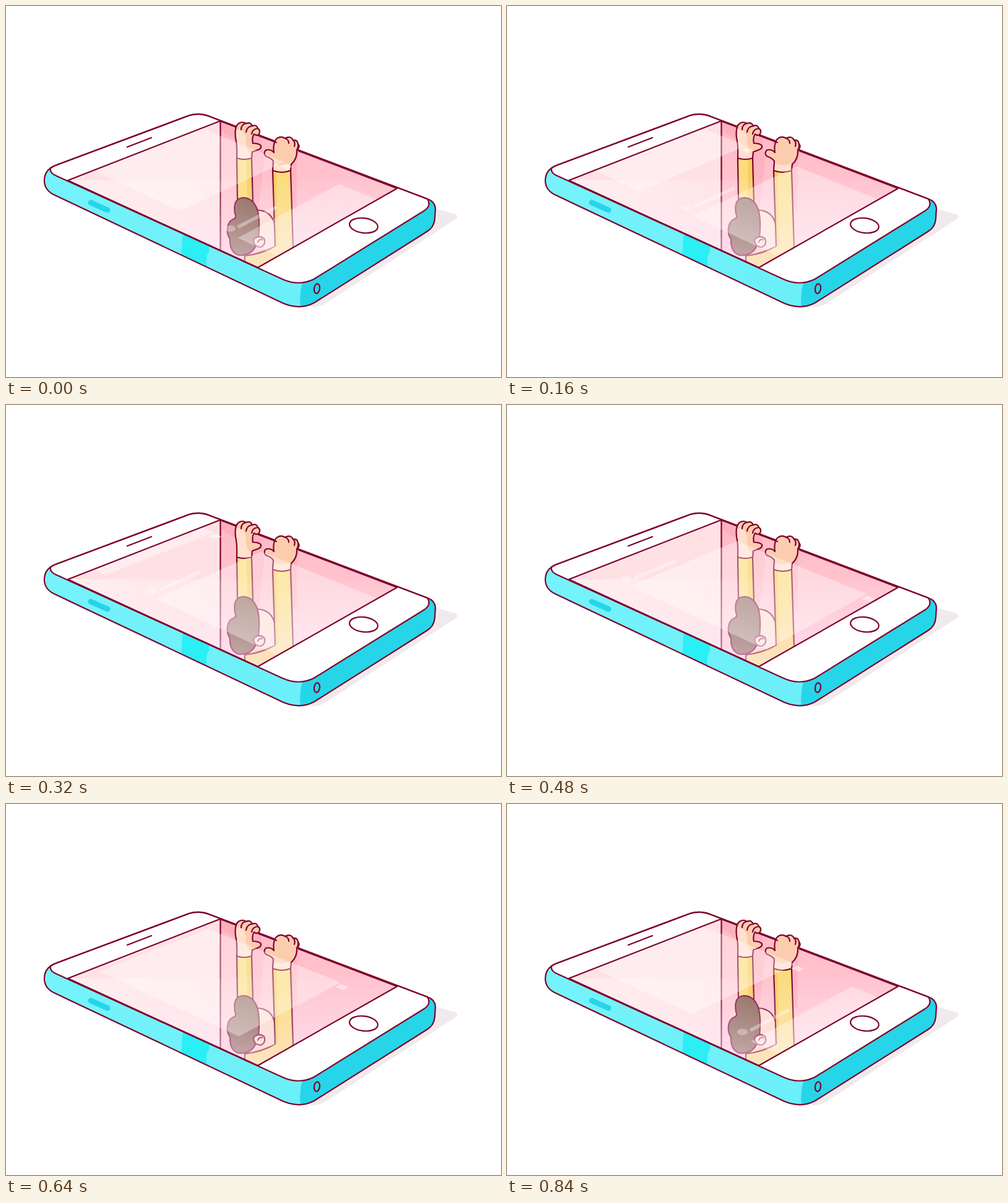
These frames come from a looping animation (800 px wide and 600 px high, 0.88 s). An HTML page:

```html
<!DOCTYPE html>
<html lang="en">
<head>
<meta charset="utf-8">
<title>Endless feed</title>
<style>
html, body { margin: 0; width: 100%; height: 100%; overflow: hidden; background: #fff; }
svg { display: block; width: 800px; height: 600px; }
.line { fill: none; stroke: #7d002d; stroke-width: 2.2; stroke-linecap: round; stroke-linejoin: round; }
</style>
</head>
<body>
<svg viewBox="0 0 800 600">
  <defs>
    <clipPath id="screen"><path d="M100 282L346 186L632 295L407 423Z"/></clipPath>
    <clipPath id="body"><path id="bodyShape" d="M72 262Q61 270 62 284Q63 298 77 305L440 477Q472 494 498 480L680 365Q692 358 693 344L694 327Q693 316 681 312L330 179Q313 172 296 177L82 257Q76 259 72 262Z"/></clipPath>
    <linearGradient id="side"><stop stop-color="#76f3fa"/><stop offset="1" stop-color="#66edf8"/></linearGradient>
    <linearGradient id="rightWall" x2="0" y2="1"><stop stop-color="#ffb9c3"/><stop offset="1" stop-color="#ffd0dc"/></linearGradient>
    <linearGradient id="haze"><stop stop-color="#fff" stop-opacity=".45"/><stop offset="1" stop-color="#fff" stop-opacity="0"/></linearGradient>
    <linearGradient id="glow" gradientUnits="userSpaceOnUse" x1="0" y1="275" x2="0" y2="425">
      <stop stop-color="#fff0fb" stop-opacity="0"/><stop offset=".55" stop-color="#ffebfc" stop-opacity=".28"/><stop offset="1" stop-color="#ffe9ff" stop-opacity=".55"/>
    </linearGradient>
  </defs>

  <path fill="#f0eaee" d="M685 325L727 337Q732 340 728 344L515 482Q506 488 490 487Z"/>
  <g clip-path="url(#body)">
    <path fill="url(#side)" d="M50 170H710V500H50Z"/>
    <path fill="#2aeff4" d="M286 366L328 386V398Q323 402 324 421L283 402Z"/>
    <path fill="#27d5e8" d="M483 440L710 300V500H481Q473 486 476 465Q476 452 483 440Z"/>
  </g>
  <path d="M137 318L164 330" stroke="#25d5ea" stroke-width="9" stroke-linecap="round"/>
  <path class="line" style="fill:#fff" d="M72 262Q70 270 82 275L445 441Q472 454 497 442L676 331Q688 323 681 312L330 179Q313 172 296 177L82 257Q76 259 72 262Z"/>
  <use href="#bodyShape" class="line"/>
  <ellipse class="line" cx="502.5" cy="457" rx="4.5" ry="7.8" transform="rotate(8 502 457)"/>
  <ellipse class="line" style="fill:#fff" cx="578" cy="355" rx="23" ry="12" transform="rotate(7 578 355)"/>
  <path class="line" d="M196 228L235 213"/>

  <g clip-path="url(#screen)">
    <path fill="#ffe1e4" d="M90 180H346V430H90Z"/>
    <path fill="url(#rightWall)" d="M346 180H640V430H346Z"/>
    <path fill="#f99fae" opacity=".4" d="M346 186L372 196V218L346 200ZM398 206L412 211L417 250L408 330H398ZM462 230L474 236L470 252V330H462Z"/>
    <path class="line" d="M346.5 186V396"/>

    <path fill="#fbdc7b" d="M386 403L436 388L466 380V425H386Z"/>
    <path class="line" d="M386 403V416M386 404Q414 401 435 388"/>
    <path fill="#fddccb" d="M400 330Q430 330 435 356V388Q414 398 400 390Z"/>
    <path class="line" d="M406 330Q430 331 435 356V388"/>
    <path fill="#fbdc7b" d="M373 246H397L399 322H374ZM431 266H460L464 392H435Z"/>
    <path fill="#f8cd61" d="M389 249H397L399 322H390ZM431 267H437L440 388H435Z"/>
    <path class="line" d="M373 247L374 312M397 247L399 316M431 267L435 388M460 266L464 391"/>
    <path class="line" style="fill:#86604f" d="M370 336Q366 311 383 310Q399 310 406 329Q411 345 408 374L403 389Q396 404 376 403Q361 398 362 377Q355 367 359 354Q362 346 369 344Q373 341 370 336Z"/>
    <path class="line" style="fill:#fddccb" d="M402 376Q409 370 417 376Q421 385 412 390Q403 390 401 383Q399 379 402 376M407 382Q409 376 414 378"/>
  </g>

  <path class="line" style="fill:#fcccae" d="M373 246Q374 226 371 213Q369 195 376 190Q382 186 388 190Q395 187 398 194Q405 191 407 198Q412 201 409 207Q405 211 401 207Q397 213 399 222Q409 222 412 226Q413 231 406 233L398 236L397 246Q385 250 373 246Z"/>
  <path fill="#fee0cd" d="M374.5 245Q375 226 372.5 213Q371 202 374 199Q389 202 388 222Q389 234 395 238L396 245Q385 248 374.5 245Z"/>
  <path class="line" d="M380 200Q380 191 388 190M388 204Q389 195 398 194M397 207Q398 199 407 198"/>
  <path class="line" style="fill:#fcccae" d="M431 266L432 251Q429 246 420 243Q415 238 420 233Q428 231 433 237Q431 224 436 216Q443 209 451 214Q460 209 464 217Q471 216 472 223Q476 228 470 233Q471 247 461 256L460 266Q446 272 431 266Z"/>
  <path fill="#fee0cd" d="M432.5 265L433.5 254Q444 261 459 254V265Q446 269 432.5 265Z"/>
  <path class="line" d="M451 214Q457 216 457 222M464 217Q468 220 466 227M472 223Q473 228 470 233"/>

  <g clip-path="url(#screen)">
    <path fill="url(#haze)" d="M90 282H430V430H90Z"/>
    <path fill="url(#glow)" d="M90 275H640V430H90Z"/>
    <path id="cards" fill="#fff" opacity=".35"/>
    <path id="names" fill="none" stroke="#fff" stroke-width="5.5" stroke-linecap="round" opacity=".35"/>
    <path id="badges" fill="#fff" opacity=".5"/>
    <path id="avatars" fill="#fff" opacity=".32"/>
  </g>
  <path class="line" d="M371 195.5L346 186L100 282L407 423L632 295L473 234.4M408 209.6L437 220.7"/>
</svg>
<script>
const PERIOD = 880;
const $ = id => document.getElementById(id);

// Feed plane: s runs along the phone, v from the near edge (0) to the far edge (1).
const at = (s, v) => [
  141 + 298 * s + v * (176 - 15 * s),
  266 + 139 * s - v * (68 + 24 * s)
].map(n => n.toFixed(2)).join(' ');
const quad = (s0, s1, v0, v1) =>
  `M${at(s0, v0)}L${at(s0, v1)}L${at(s1, v1)}L${at(s1, v0)}Z`;

const cardStart = end => 1.1 * end + 0.265;

function draw(time) {
  const p = ((time - 580) / PERIOD % 1 + 1) % 1;
  const scroll = p + 0.029 + 0.049 * Math.cos(2 * Math.PI * (p - 0.6));
  let cards = '', names = '', badges = '', avatars = '';
  for (let k = -1; k < 2; k++) {
    const end = 0.84 - scroll + k;
    const header = 1.06 * end + 0.225;
    cards += quad(cardStart(end - 1), end, 0, 1);
    names += `M${at(header, 0.12)}L${at(header, 0.48)}`;
    badges += quad(end + 0.012, end + 0.055, 0.93, 0.985);
    avatars += `M${at(header - 0.03, 0.03)}a9 5 0 1 0 18 0a9 5 0 1 0 -18 0`;
  }
  $('cards').setAttribute('d', cards);
  $('names').setAttribute('d', names);
  $('badges').setAttribute('d', badges);
  $('avatars').setAttribute('d', avatars);
}

const begin = performance.now();
function frame() {
  draw(performance.now() - begin);
  requestAnimationFrame(frame);
}
frame();
</script>
</body>
</html>
```
